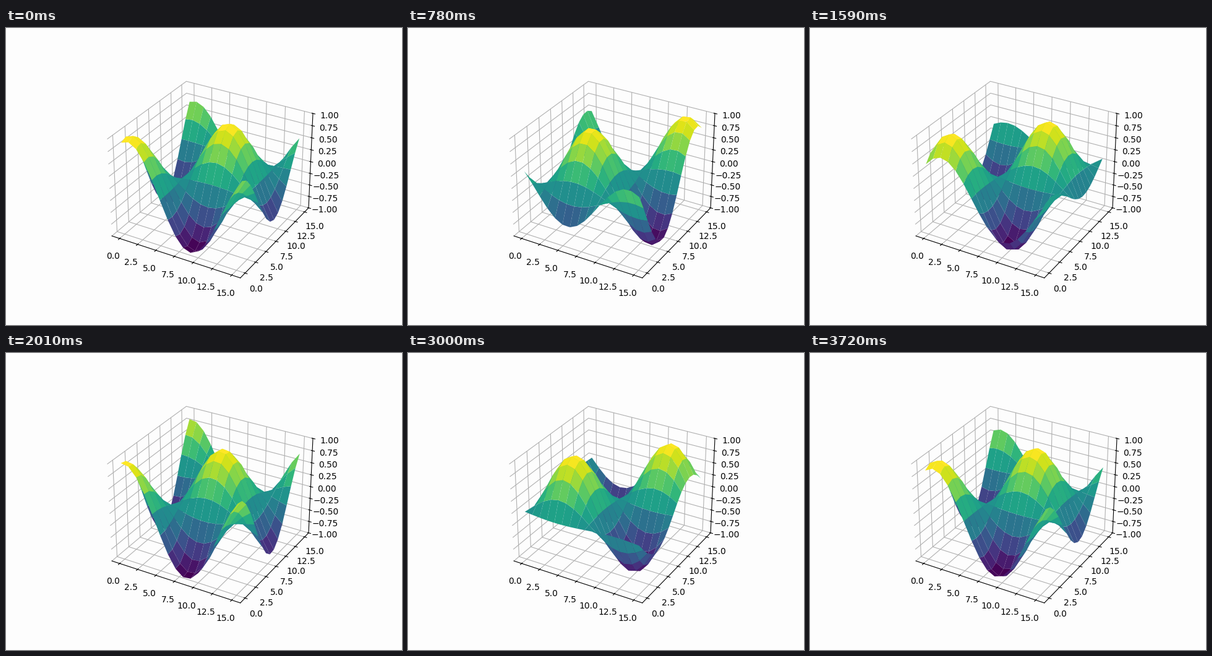
These frames come from a looping animation (640 px wide and 480 px high, 3.75 s). A matplotlib script:

```python
import numpy as np
import matplotlib.pyplot as plt
from matplotlib.animation import FuncAnimation

FRAMES = 125
INTERVAL = 30
STEP = 0.05      # phase advance per frame
WAVE = 0.39      # radians per grid cell
PHASE = -0.33
SIZE = 15
PAPER = "#fdfdfd"

fig = plt.figure(figsize=(6.4, 4.8), dpi=100, facecolor=PAPER)
ax = fig.add_subplot(projection="3d", facecolor=PAPER)
for axis in (ax.xaxis, ax.yaxis, ax.zaxis):
    axis.set_pane_color(PAPER)

# 5 % data margin plus the usual 1/48 view margin
pad = 0.05 * SIZE + 1.1 * SIZE / 48
ax.set_xlim(-pad, SIZE + pad)
ax.set_ylim(-pad, SIZE + pad)
ax.set_zlim(-1, 1)

X, Y = np.meshgrid(np.arange(SIZE + 1), np.arange(SIZE + 1))
surfaces = []


def height(t):
    return np.cos(WAVE * X + PHASE + t) * np.cos(WAVE * Y + PHASE + t)


def draw(i):
    while surfaces:
        surfaces.pop().remove()
    surfaces.append(ax.plot_surface(X, Y, height(STEP * i), cmap="viridis"))
    return surfaces


anim = FuncAnimation(fig, draw, frames=FRAMES, interval=INTERVAL,
                     init_func=lambda: draw(0), repeat=True, repeat_delay=0)
plt.show()
```
